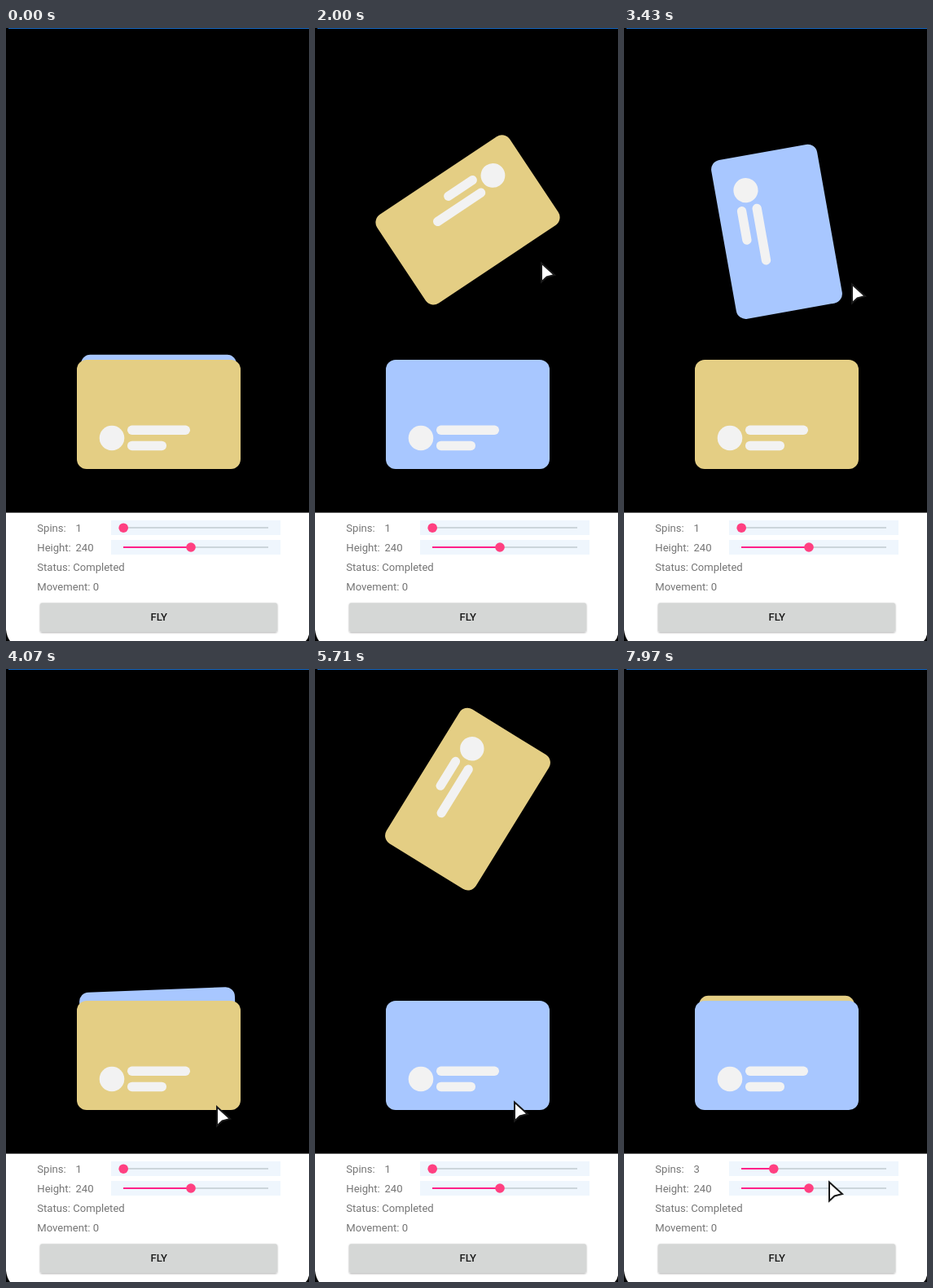
An HTML page for the animation above (8 s loop, 372 by 752 pixels).

```html
<!DOCTYPE html>
<html lang="en">
<head>
<meta charset="utf-8">
<title>Flying cards</title>
<style>
html, body { margin: 0; width: 100%; height: 100%; overflow: hidden; background: #000; }
svg { display: block; width: 372px; height: 752px; }
text { font: 13.1px Roboto, sans-serif; fill: #757575; }
.fly { font-weight: 500; fill: #1c1c1c; text-anchor: middle; }
.detail { fill: #f2f2f2; }
.strip { fill: #eff6fd; }
.track { fill: #ccd5db; }
.fill { fill: #ff2189; }
.thumb { fill: #ff4081; }
</style>
</head>
<body>
<svg viewBox="0 0 372 752">
  <defs>
    <g id="shape">
      <rect x="-100.5" y="-67" width="201" height="134" rx="12"/>
      <g class="detail">
        <circle cx="-57.5" cy="29" r="15.3"/>
        <rect x="-38.5" y="13.5" width="77" height="11.5" rx="5.7"/>
        <rect x="-38.5" y="32.7" width="48" height="11.5" rx="5.7"/>
      </g>
    </g>
    <filter id="shadow" x="-5%" y="-20%" width="110%" height="150%">
      <feDropShadow dx="0" dy="1" stdDeviation="1" flood-opacity=".35"/>
    </filter>
  </defs>
  <rect width="372" height="752"/>
  <rect x="3" width="369" height="1" fill="#1769c4"/>
  <g id="cards">
    <use id="blue" href="#shape" fill="#a8c7ff"/>
    <use id="gold" href="#shape" fill="#e4ce84"/>
  </g>
  <rect y="594.6" width="372" height="158" fill="#fff"/>
  <path d="M0 738Q1 747 5 752H0ZM372 744Q371 749 368 752H372Z"/>
  <text x="38.3" y="618.2">Spins:</text><text id="spins" x="85.5" y="618.2">1</text>
  <text x="38.3" y="642">Height:</text><text x="85.5" y="642">240</text>
  <text id="status" x="38.3" y="665.8"></text>
  <text id="movement" x="38.3" y="689.8"></text>
  <rect class="strip" x="129" y="604" width="208" height="18"/>
  <rect class="strip" x="129" y="628" width="208" height="18"/>
  <rect class="track" x="144" y="612" width="178" height="2"/>
  <rect class="track" x="144" y="636" width="178" height="2"/>
  <rect id="spinFill" class="fill" x="144" y="612" height="2"/>
  <rect class="fill" x="144" y="636" width="83" height="2"/>
  <circle id="spinThumb" class="thumb" cy="613.2" r="5.8"/>
  <circle class="thumb" cx="227" cy="637" r="5.8"/>
  <rect x="42" y="705.3" width="291" height="35.4" rx="2" fill="#d5d7d6" filter="url(#shadow)"/>
  <text class="fly" x="187.7" y="727.2">FLY</text>
  <path id="cursor" d="M1 2.5V25.5L7.5 19.5L17 17Z" fill="#fff" stroke="#1a1a1a" stroke-width="2"/>
</svg>
<script>
const LOOP = 8000, CX = 187.5, FRONT_Y = 474, BACK_Y = 464.5, BACK_SCALE = 0.95, TILT = -10;
const $ = id => document.getElementById(id);
const mix = (a, b, p) => a + (b - a) * p;
const span = (t, a, b) => Math.max(0, Math.min(1, (t - a) / (b - a)));
const smooth = p => p * p * (3 - 2 * p);

// stops: [time, x, y], eased between neighbours
function along(stops, t) {
  const i = Math.max(1, Math.min(stops.length - 1, stops.findLastIndex(s => s[0] <= t) + 1));
  const [a, b] = [stops[i - 1], stops[i]], p = smooth(span(t, a[0], b[0]));
  return [mix(a[1], b[1], p), mix(a[2], b[2], p)];
}

// A throw: pull the card, wait, fling it up, let go, rise to the top, land behind.
// Times count from the grab; grip is where the pointer holds the card.
const flick = { pull: [-6, -27], fling: 370, release: 541, exit: 283, peak: 1080, top: 229.5, land: 1393 };
const plunge = { pull: [-14.5, 107], fling: 570, release: 988, exit: 150, peak: 1040, top: 135, land: 1446 };

function makeThrow(card, at, grip, style) {
  const [dx, dy] = style.pull, pulled = [CX + dx, FRONT_Y + dy];
  const drag = [[at, CX, FRONT_Y], [at + 250, ...pulled], [at + style.fling, ...pulled],
    [at + style.release, CX, style.exit]];
  const hand = drag.map(([t, x, y]) => [t, x + grip[0] - CX, y + grip[1] - FRONT_Y]);
  return { ...style, card, at, drag, hand };
}

const throws = [
  makeThrow('gold', 1100, [268, 497], flick),
  makeThrow('blue', 2683, [261, 492], flick),
  makeThrow('gold', 4560, [233, 456], plunge)
];

const pointer = [
  [210, 307, 694], [690, 269, 499],
  [2000, 277, 286], [2480, 261, 485],
  [3430, 279, 312], [4080, 258, 535],
  [5710, 244, 529], [6270, 208, 634], [6580, 196, 608],
  [7340, 198, 610], [7650, 237, 612], [7970, 251, 627],
  ...throws.flatMap(f => f.hand)
].sort((a, b) => a[0] - b[0]);

function place(id, x, y, angle, scale) {
  $(id).setAttribute('transform', `translate(${x} ${y}) rotate(${angle}) scale(${scale})`);
}

function thrown(f, t) {
  const scale = mix(1, BACK_SCALE, smooth(span(t, f.fling, f.land)));
  if (t < f.release) return [...along(f.drag, f.at + t), TILT * span(t, 0, 150), scale];
  const y = t < f.peak
    ? mix(f.top, f.exit, (1 - span(t, f.release, f.peak)) ** 2)
    : mix(f.top, BACK_Y, span(t, f.peak, f.land) ** 2);
  return [CX, y, mix(TILT, 360, span(t, f.release, f.land)), scale];
}

function draw(now) {
  const f = throws.findLast(f => now >= f.at) || throws[0];
  const t = Math.max(0, now - f.at), dragging = t > 0 && t < f.release;
  const other = f.card === 'gold' ? 'blue' : 'gold';
  const pose = thrown(f, t), rise = span(t, f.release, f.release + 140);
  place(f.card, ...pose);
  place(other, CX, mix(BACK_Y, FRONT_Y, rise), 0, mix(BACK_SCALE, 1, rise));
  const front = t < f.release ? f.card : other;
  if ($('cards').lastElementChild.id !== front) $('cards').append($(front));

  const shift = dragging ? Math.hypot(pose[0] - CX, pose[1] - FRONT_Y) / 49 : 0;
  $('status').textContent = 'Status: ' + (dragging ? 'Running' : 'Completed');
  $('movement').textContent = 'Movement: ' + +shift.toFixed(1);

  const spins = now < 7340 ? 1 : 3, done = (spins - 1) * 178 / 9;
  $('spins').textContent = spins;
  $('spinThumb').setAttribute('cx', 144.2 + done);
  $('spinFill').setAttribute('width', done);

  $('cursor').setAttribute('visibility', now < 210 ? 'hidden' : 'visible');
  $('cursor').setAttribute('transform', `translate(${along(pointer, now)})`);
}

const began = performance.now();
function tick() {
  draw((performance.now() - began) % LOOP);
  requestAnimationFrame(tick);
}
tick();
</script>
</body>
</html>
```
